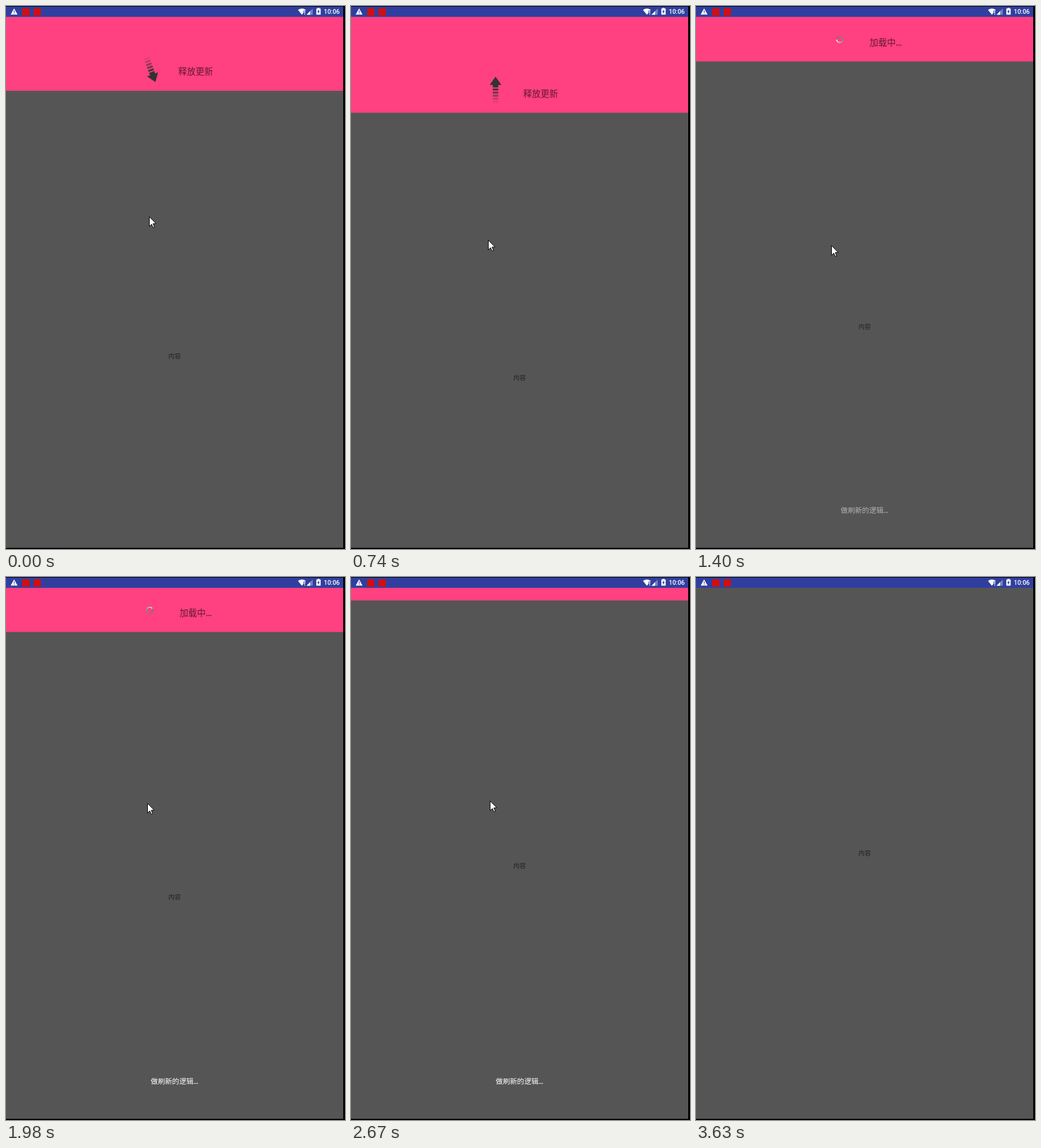
Recreate the animation shown at these times as an HTML page with a canvas. Size 564 by 903 pixels, loop 3.73 s.

```html
<!DOCTYPE html>
<html lang="zh-CN">
<head>
<meta charset="utf-8">
<title>下拉刷新</title>
<style>
html, body { margin: 0; width: 100%; height: 100%; overflow: hidden; background: #000; }
canvas { display: block; }
</style>
</head>
<body>
<canvas id="stage" width="564" height="903"></canvas>
<script>
const ctx = document.getElementById('stage').getContext('2d');
const LOOP = 3730, STEP = LOOP / 27;   // the screen refreshes once per step
const RIGHT = 561, BOTTOM = 901;
const BAR = 18, OPEN = 91.5, PULLED = 180;   // header edge: closed, loading, fully pulled
const RELEASE = 906, CLOSE = 2498, SETTLE = 100;
const PINK = '#ff4081', GREY = '#555', BLUE = '#303f9f', INK = 'rgba(0,0,0,.62)';
const FONT = 'Roboto, "Noto Sans CJK SC", "Noto Sans CJK", sans-serif';

const ramp = (t, from, to) => Math.min(1, Math.max(0, (t - from) / (to - from)));
const mix = (a, b, k) => a + (b - a) * k;
const settle = (t, since, from, to) => mix(to, from, Math.exp((since - t) / SETTLE));

function headerEdge(t) {
  if (t < RELEASE) return Math.min(PULLED, 141 + t * .053);
  if (t < CLOSE) return settle(t, RELEASE, PULLED, OPEN);
  return settle(t, CLOSE, OPEN, BAR + .5);
}

// The arrow flips from down to up, slow at both ends.
function arrowTurn(t) {
  return 90 + 90 * Math.cos(Math.PI * ramp(t, -65, 235));
}

function pointerAt(t) {
  if (t < 1900) {
    const k = 1 - (1 - ramp(t, 0, 1000)) ** 1.4;
    return [mix(238, 225, k), mix(350, 398, k)];
  }
  const drift = ramp(t, 1930, 2620), leave = ramp(t, 2625, 2900);
  return [mix(235, 231, drift) + 196 * leave, mix(376, 372, drift) + 258 * leave];
}

function rect(color, x, y, w, h) {
  ctx.fillStyle = color;
  ctx.fillRect(x, y, w, h);
}

function poly(color, ...pts) {
  ctx.beginPath();
  for (let i = 0; i < pts.length; i += 2) ctx.lineTo(pts[i], pts[i + 1]);
  ctx.closePath();
  ctx.fillStyle = color;
  ctx.fill();
}

function label(str, x, y, size, color) {
  ctx.font = `500 ${size}px ${FONT}`;
  ctx.textAlign = 'center';
  ctx.fillStyle = color;
  ctx.fillText(str, x, y + size * .37);
}

function arrow(x, y, deg) {
  ctx.save();
  ctx.translate(x, y);
  ctx.rotate(deg * Math.PI / 180);
  poly('#333', 0, -23.5, 9.8, -9.8, 4.6, -9.8, 4.6, -5.5, -4.6, -5.5, -4.6, -9.8, -9.8, -9.8);
  for (let i = 0; i < 5; i++) {
    ctx.globalAlpha = .92 - i * .2;
    rect('#333', -4.6, -3.8 + i * 5.1, 9.2, 3.2);
  }
  ctx.restore();
}

function spinner(x, y, deg) {
  const sweep = ctx.createConicGradient(deg * Math.PI / 180, x, y);
  sweep.addColorStop(0, '#9a7080');
  sweep.addColorStop(.15, '#77757a');
  sweep.addColorStop(.55, '#8c888a');
  sweep.addColorStop(1, '#eee');
  ctx.strokeStyle = sweep;
  ctx.lineWidth = 1.9;
  ctx.beginPath();
  ctx.arc(x, y, 4.9, 0, Math.PI * 2);
  ctx.stroke();
}

function pointer(x, y) {
  ctx.save();
  ctx.translate(Math.round(x) + .5, Math.round(y) + .5);
  ctx.lineWidth = 1;
  ctx.strokeStyle = '#000';
  poly('#fff', 0, 0, 0, 16, 3.7, 12.5, 6.3, 18, 8.6, 17, 6.1, 11.5, 11, 11.3);
  ctx.stroke();
  ctx.restore();
}

function statusBar() {
  rect(BLUE, 0, 1, RIGHT, BAR - 1);

  // warning sign and two app badges
  poly('#fff', 13.5, 4, 19.2, 14.2, 7.8, 14.2);
  rect(BLUE, 13, 7.5, 1.2, 3.2);
  rect(BLUE, 13, 11.7, 1.2, 1.3);
  for (const x of [27, 46]) rect('#d50d0d', x, 4, 12, 12);

  // wifi
  ctx.beginPath();
  ctx.moveTo(492.3, 14.5);
  ctx.lineTo(485.8, 6.6);
  ctx.quadraticCurveTo(492.3, 2, 498.8, 6.6);
  ctx.closePath();
  ctx.fillStyle = '#fff';
  ctx.fill();
  rect(BLUE, 495, 7.6, 4, 7);
  rect('#fff', 496.2, 8, 1.4, 4);
  rect('#fff', 496.2, 12.8, 1.4, 1.5);

  // signal
  poly('rgba(255,255,255,.35)', 510.4, 4, 510.4, 14.4, 500, 14.4);
  poly('#fff', 506, 8.4, 506, 14.4, 500, 14.4);

  // battery
  rect('#fff', 516.3, 4.2, 7.2, 10.2);
  rect('#fff', 518.3, 3, 3.2, 1.4);
  poly(BLUE, 520.6, 5.4, 517.8, 9.9, 519.4, 9.9, 519.2, 13, 522, 8.5, 520.4, 8.5);

  label('10:06', 542, 9.6, 10.4, '#fff');
}

function header(t, edge) {
  ctx.save();
  ctx.beginPath();
  ctx.rect(0, BAR, RIGHT, edge - BAR);
  ctx.clip();
  rect(PINK, 0, BAR, RIGHT, edge);
  const loading = t > RELEASE;
  if (loading) spinner(239, edge - 36.5, 146 + t * .28);
  else arrow(240.5, edge - 36.5, arrowTurn(t));
  label(loading ? '加载中…' : '释放更新', 315.5, edge - 32, 14.5, INK);
  ctx.restore();
}

function draw(t) {
  const edge = headerEdge(t);
  rect('#000', 0, 0, 564, 903);
  rect(GREY, 0, BAR, RIGHT, BOTTOM - BAR);
  if (edge > BAR + 1) header(t, edge);
  label('内容', 280.5, edge + 441, 10.4, INK);
  statusBar();

  ctx.globalAlpha = ramp(t, 1160, 1560) * (1 - ramp(t, 2980, 3500));
  label('做刷新的逻辑…', 280.5, 838.5, 11.85, '#fff');
  ctx.globalAlpha = 1;

  if (t < 3000) pointer(...pointerAt(t));
}

const start = performance.now();
function frame() {
  const t = (performance.now() - start) % LOOP;
  draw(Math.floor(t / STEP) * STEP);
  requestAnimationFrame(frame);
}
frame();
</script>
</body>
</html>
```
